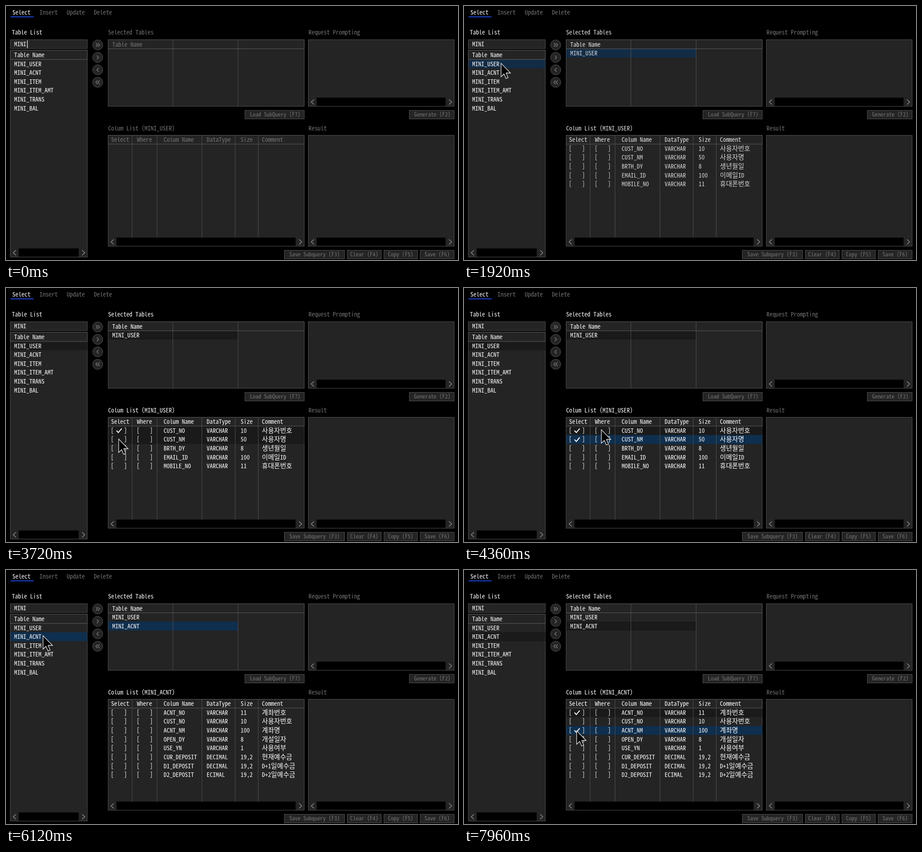
Recreate the animation shown at these times as an HTML page. Size 998 by 561 pixels, loop 8 s.

```html
<!DOCTYPE html>
<html lang="ko">
<head>
<meta charset="utf-8">
<title>Query builder</title>
<style>
html, body { margin: 0; width: 100%; height: 100%; overflow: hidden; background: #000; }
svg { display: block; width: 998px; height: 561px; }
text { font: 13.4px "Noto Sans Mono CJK KR", "Noto Sans Mono CJK JP", "Noto Sans CJK KR", "Noto Sans Mono", monospace; white-space: pre; }
.small { font-size: 12.4px; }
path { fill: none; }
</style>
</head>
<body>
<svg id="stage" viewBox="0 0 998 561"></svg>
<script>
const LOOP = 8000, ROW = 19.65, SIZE = 13.4;
const PANEL = '#242424', EDGE = '#505050', DIM = '#747474', DARK = '#1a1a1a', BLUE = '#0f2f4e';
const stage = document.getElementById('stage');
const animated = [];

function add(parent, tag, attrs) {
  const el = document.createElementNS('http://www.w3.org/2000/svg', tag);
  for (const k in attrs) el.setAttribute(k, attrs[k]);
  return parent.appendChild(el);
}
const group = (attrs = {}) => add(stage, 'g', attrs);
const back = group(), marks = group(), lines = group({ stroke: EDGE });
const dim = group({ fill: DIM }), white = group({ fill: '#fff' }), waking = group();

// Latin advances half an em and Hangul a whole one, whichever font is found.
function advance(char) {
  const probe = add(dim, 'text', {});
  probe.textContent = char.repeat(20);
  const em = probe.getComputedTextLength() / 20 / SIZE;
  probe.remove();
  return em;
}
const spacing = 0.5 - advance('M');
const hangulSize = SIZE / advance('번');

function label(parent, x, mid, str, small) {
  const el = add(parent, 'text', { x, y: mid + (small ? 4.4 : 4.7) });
  if (small) el.setAttribute('class', 'small');
  if (Math.abs(spacing) > 0.01) el.style.letterSpacing = spacing + 'em';
  for (const part of str.match(/[가-힣]+|[^가-힣]+/g) || []) {
    const span = add(el, 'tspan', {});
    span.textContent = part;
    if (part >= '가') span.style.cssText = `font-size:${hangulSize}px;letter-spacing:0`;
  }
  return el;
}
const box = (x, y, r, b, fill = PANEL, stroke = EDGE, parent = back) =>
  add(parent, 'rect', { x: x + .5, y: y + .5, width: r - x - 1, height: b - y - 1, fill, stroke });
const line = (x1, y1, x2, y2) => add(lines, 'path', { d: `M${x1} ${y1}L${x2} ${y2}` });
const chevron = (x, y, w, h, dir, stroke, width) => add(lines, 'path', {
  d: `M${x - dir * w / 2} ${y - h / 2}l${dir * w} ${h / 2}l${-dir * w} ${h / 2}`, stroke, 'stroke-width': width });

function scrollPanel(x, y, r, b) {
  box(x, y, r, b);
  add(back, 'rect', { x: x + 19, y: b - 19.5, width: r - x - 38.5, height: 18.5, fill: '#000' });
  chevron(x + 10, b - 10, 6, 11, -1, '#8c8c8c', 1.5);
  chevron(r - 9, b - 10, 6, 11, 1, '#8c8c8c', 1.5);
}

// Static layout
['Select', 'Insert', 'Update', 'Delete'].forEach((s, i) => label(i ? dim : white, 14 + 60 * i, 14, s));
add(back, 'rect', { x: 10, y: 23, width: 51, height: 2, fill: '#1d43d6' });
box(9, 74, 180, 94.5);
scrollPanel(9, 97, 180, 555);
box(225, 74, 659, 222);
scrollPanel(667, 74, 990, 222);
scrollPanel(225, 285, 659, 531);
scrollPanel(667, 285, 990, 531);
box(9, 97, 180, 118.5, 'none', '#626262', lines);
box(225, 74, 659, 95, 'none', '#5c5c5c', lines);
box(225, 285, 659, 305.5, 'none', '#5c5c5c', lines);
for (const x of [368.5, 512.5]) line(x, 74, x, 221);
for (const x of [278.5, 333.5, 432.5, 506, 557]) line(x, 285, x, 511);

[86, 113.5, 141, 168.5].forEach((y, i) => {
  add(back, 'circle', { cx: 202.5, cy: y, r: 11.2, fill: PANEL, stroke: EDGE });
  const dir = i < 2 ? 1 : -1;
  for (const dx of i % 3 ? [0] : [-2.3, 2.3]) chevron(202.5 + dx, y, 4, 8, dir, '#858585', 1.2);
});

[[527, 659, 230, 538.5, 'Load SubQuery (F7)'], [890, 990, 230, 901, 'Generate (F2)'],
 [614, 748, 539, 625.5, 'Save Subquery (F3)'], [753, 829, 539, 760, 'Clear (F4)'],
 [834, 909, 539, 843.5, 'Copy (F5)'], [914, 990, 539, 924, 'Save (F6)']]
  .forEach(([x, r, y, tx, s]) => { box(x, y, r, y + 20); label(dim, tx, y + 9.8, s, true); });

label(white, 13, 58.5, 'Table List');
label(dim, 668, 58.5, 'Request Prompting');
label(dim, 668, 270.3, 'Result');
label(white, 18, 84.5, 'MINI');
label(white, 18, 108, 'Table Name');
['USER', 'ACNT', 'ITEM', 'ITEM_AMT', 'TRANS', 'BAL'].forEach((s, i) => label(white, 18, 127.8 + ROW * i, 'MINI_' + s));

label(waking, 225.5, 58.5, 'Selected Tables');
label(waking, 234.5, 85, 'Table Name');
const columnTitle = label(waking, 225.5, 270.3, '');
const colX = [232, 289, 348, 443, 518, 565];
['Select', 'Where', 'Colum Name', 'DataType', 'Size', 'Comment'].forEach((s, i) => label(waking, colX[i], 295.5, s));

// Timed parts
const clamp = v => Math.max(0, Math.min(1, v));
function timed(el, from, to, fade) {
  animated.push(t => el.setAttribute('opacity', clamp((t - from) / fade) - clamp((t - to) / fade)));
  return el;
}
const USER_ON = 1760, ACNT_ON = 5880, END = 9000;

function columns(from, to, rows) {
  const g = timed(group({ fill: '#fff' }), from, to, 200);
  rows.forEach((row, i) => {
    const y = 315 + ROW * i;
    for (const x of colX.slice(0, 2)) label(g, x - .7, y, '[   ]').style.wordSpacing = '.8px';
    row.split(' ').forEach((s, c) => label(g, colX[c + 2], y, s));
  });
}
columns(USER_ON, ACNT_ON, ['CUST_NO VARCHAR 10 사용자번호', 'CUST_NM VARCHAR 50 사용자명',
  'BRTH_DY VARCHAR 8 생년월일', 'EMAIL_ID VARCHAR 100 이메일ID', 'MOBILE_NO VARCHAR 11 휴대폰번호']);
columns(ACNT_ON, END, ['ACNT_NO VARCHAR 11 계좌번호', 'CUST_NO VARCHAR 10 사용자번호',
  'ACNT_NM VARCHAR 100 계좌명', 'OPEN_DY VARCHAR 8 개설일자', 'USE_YN VARCHAR 1 사용여부',
  'CUR_DEPOSIT DECIMAL 19,2 현재예수금', 'D1_DEPOSIT DECIMAL 19,2 D+1일예수금', 'D2_DEPOSIT ECIMAL 19,2 D+2일예수금']);
timed(label(white, 234.5, 104.3, 'MINI_USER'), USER_ON, END, 200);
timed(label(white, 234.5, 124, 'MINI_ACNT'), ACNT_ON, END, 200);

const AREAS = { list: [10, 117.8, 169.5], picked: [226, 94.3, 287], cols: [226, 305.1, 432.5] };
const hover = add(marks, 'rect', { height: ROW, fill: DARK });
function mark(area, row, fill, from, to, fade = 80) {
  const [x, y, width] = AREAS[area];
  timed(add(marks, 'rect', { x, y: y + ROW * row, width, height: ROW, fill }), from, to, fade);
}
for (const area of ['list', 'picked']) {
  mark(area, 0, BLUE, USER_ON, 3120, 200);
  mark(area, 0, DARK, 3120, ACNT_ON, 200);
  mark(area, 1, BLUE, ACNT_ON, 7320, 200);
  mark(area, 1, DARK, 7320, END, 200);
}
mark('cols', 0, BLUE, 3120, 3620);
mark('cols', 0, DARK, 3620, 4480);
mark('cols', 0, BLUE, 4480, ACNT_ON);
mark('cols', 1, BLUE, 3760, 4480);
mark('cols', 1, DARK, 4480, ACNT_ON);
mark('cols', 0, BLUE, 7320, 7760);
mark('cols', 0, DARK, 7760, END);
mark('cols', 2, BLUE, 7800, END);

for (const [x, row, from, to] of [[244, 0, 3120, ACNT_ON], [244, 1, 3760, ACNT_ON], [301, 0, 4480, ACNT_ON],
  [244, 0, 7320, END], [244, 2, 7800, END]])
  timed(add(stage, 'path', { d: `M${x} ${315 + ROW * row}l4 4.3l7.5 -9`, stroke: '#fff', 'stroke-width': 2 }), from, to, 80);

const caret = add(stage, 'rect', { x: 46.6, y: 76, width: 1.3, height: 17, fill: '#fff' });
const cursor = add(stage, 'path', {
  d: 'M.8 1.6V31.3L7.3 25.2L11.8 35.2L16.4 33.2L12 23H21.6Z',
  style: 'fill:#000', stroke: '#e6e6e6', 'stroke-width': 1.3 });

// Pointer moves: start, end, bend x, bend y, target x, target y, time bias
const MOVES = [
  [434, 1338, 187, 238, 81, 125],
  [2380, 2960, 165, 219, 248, 313.5],
  [3280, 3660, 248, 322, 248, 332],
  [3800, 4320, 275, 322, 302.5, 311.5],
  [4800, 5680, 108, 227, 81, 143.5, .777],
  [6580, 7160, 165, 229, 248, 313.5],
  [7440, 7760, 248, 334, 248, 353.5]];

function pointer(t) {
  let x = 457.5, y = 301.5;
  for (const [from, to, bx, by, tx, ty, bias = 1] of MOVES) {
    if (t < from) break;
    const u = clamp((t - from) / (to - from)) ** bias, s = u * u * (3 - 2 * u);
    const bend = (a, b, c) => (1 - s) ** 2 * a + 2 * s * (1 - s) * b + s * s * c;
    [x, y] = [bend(x, bx, tx), bend(y, by, ty)];
  }
  return [x, y];
}

function showHover(t, px, py) {
  const area = t < USER_ON ? 'list' : t > 2960 ? 'cols' : '';
  const [x, y, width] = AREAS[area] || [0, 0, 0];
  const row = Math.floor((py - y) / ROW), count = area === 'list' ? 6 : t < ACNT_ON ? 5 : 8;
  const on = px > x && px < x + width && row >= 0 && row < count;
  hover.setAttribute('opacity', on ? 1 : 0);
  if (on) { hover.setAttribute('x', x); hover.setAttribute('y', y + ROW * row); hover.setAttribute('width', width); }
}

function draw(t) {
  animated.forEach(f => f(t));
  const v = Math.round(116 + 139 * clamp((t - USER_ON) / 200));
  waking.setAttribute('fill', `rgb(${v},${v},${v})`);
  columnTitle.textContent = `Colum List (MINI_${t < ACNT_ON + 80 ? 'USER' : 'ACNT'})`;
  caret.setAttribute('opacity', t < USER_ON ? .5 + .5 * Math.cos(2 * Math.PI * Math.max(0, t - 40) / 1240) : 0);
  const [x, y] = pointer(t);
  cursor.setAttribute('transform', `translate(${x} ${y})`);
  cursor.setAttribute('opacity', clamp((t - 60) / 200));
  showHover(t, x, y);
}

const start = performance.now();
function tick() {
  draw((performance.now() - start) % LOOP);
  requestAnimationFrame(tick);
}
tick();
</script>
</body>
</html>
```
